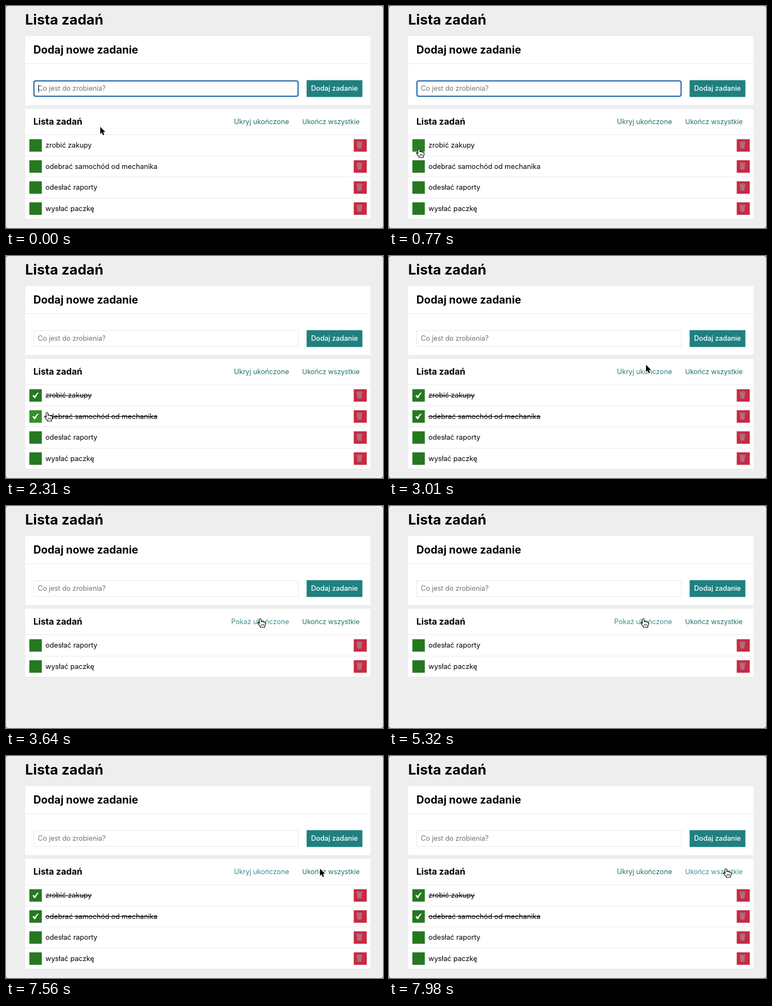
Recreate the animation shown at these times as an HTML page with a canvas. Size 688 px wide and 406 px high, loop 8 s.

```html
<!DOCTYPE html>
<html lang="pl">
<head>
<meta charset="utf-8">
<title>Lista zadań</title>
<style>
html, body { margin: 0; width: 100%; height: 100%; overflow: hidden; background: #eee; }
canvas { display: block; }
</style>
</head>
<body>
<canvas id="stage" width="688" height="406"></canvas>
<script>
const ctx = document.getElementById('stage').getContext('2d');
const LOOP = 8000;
const FIRST_CLICK = 1050, SECOND_CLICK = 1950, HIDE = 3570, SHOW = 5740;
const ROW = 38.5, LIST_TOP = 235.5;
const tasks = [
  { text: 'zrobić zakupy', doneAt: FIRST_CLICK },
  { text: 'odebrać samochód od mechanika', doneAt: SECOND_CLICK },
  { text: 'odesłać raporty', doneAt: Infinity },
  { text: 'wysłać paczkę', doneAt: Infinity }
];

// Pointer stops: time, x, y
const stops = [
  [70, 172, 221], [770, 54.5, 261], [1420, 54.5, 261], [1800, 57, 292],
  [2200, 57, 292], [2310, 75, 286], [3010, 469, 199], [3180, 464, 206],
  [7300, 464, 206], [7700, 615, 206]
];
const hideLink = { x: 411, y: 202, w: 106, h: 20 };
const finishLink = { x: 541, y: 202, w: 105, h: 20 };
const checkbox = row => ({ x: 43, y: 244 + row * ROW, w: 22, h: 22 });

function pointerAt(t) {
  const next = stops.findIndex(s => s[0] > t);
  if (next === 0) return stops[0].slice(1);
  if (next < 0) return stops[stops.length - 1].slice(1);
  const [t0, x0, y0] = stops[next - 1], [t1, x1, y1] = stops[next];
  const p = (t - t0) / (t1 - t0), e = p * p * (3 - 2 * p);
  return [x0 + (x1 - x0) * e, y0 + (y1 - y0) * e];
}

function isOver(box, t) {
  const [x, y] = pointerAt(t - 70);
  return x >= box.x && x <= box.x + box.w && y >= box.y && y <= box.y + box.h;
}

// Share of the last 200 ms spent over the box, used as a colour fade
function hoverLevel(box, t) {
  let hits = 0;
  for (let k = 0; k < 10; k++) hits += isOver(box, t - k * 20);
  return hits / 10;
}

const mix = (a, b, p) => `rgb(${a.map((v, i) => Math.round(v + (b[i] - v) * p))})`;

function rect(x, y, w, h, color) {
  ctx.fillStyle = color;
  ctx.fillRect(x, y, w, h);
}

// Filled box with a soft edge
function button(x, y, w, h, color) {
  rect(x - .4, y - .4, w + .8, h + .8, color);
}

function label(str, x, y, size, color = '#000', weight = 400, align = 'left') {
  ctx.font = `${weight} ${size}px Inter, sans-serif`;
  ctx.textAlign = align;
  ctx.fillStyle = color;
  ctx.fillText(str, x, y);
}

function polygon(points, color) {
  ctx.beginPath();
  points.forEach(([x, y]) => ctx.lineTo(x, y));
  ctx.closePath();
  ctx.fillStyle = color;
  ctx.fill();
}

function at(x, y, draw) {
  ctx.save();
  ctx.translate(x, y);
  draw();
  ctx.restore();
}

function tick() {
  ctx.fillStyle = '#fff';
  ctx.fill(new Path2D('M-5.8 .6Q-4.6-1-3.2-.8Q-2.2-.3-1.6 1.4Q.8-3.4 3.6-5H5.9Q2-1.2-.2 4.2Q-1.8 5.6-3 4.6Q-4.2 1.6-5.8 .6Z'));
}

function trash() {
  polygon([[-5, -5], [5, -5], [3.8, 5.6], [2.5, 6.4], [-2.5, 6.4], [-3.8, 5.6]], '#ab6578');
  ctx.strokeStyle = '#bd7f8f';
  ctx.lineWidth = .7;
  ctx.beginPath();
  for (const x of [-2.4, 0, 2.4]) {
    ctx.moveTo(x, -3);
    ctx.lineTo(x * .8, 5);
  }
  ctx.stroke();
  ctx.beginPath();
  ctx.ellipse(0, -5, 5.3, 1.5, 0, 0, 7);
  ctx.fillStyle = '#a05f72';
  ctx.fill();
  ctx.stroke();
}

function arrow() {
  const shape = [[0, 0], [0, 13], [3, 10.3], [5, 15.2], [7.3, 14.2], [5.3, 9.5], [9.2, 9.2]];
  ctx.lineJoin = 'round';
  ctx.strokeStyle = '#fff';
  ctx.lineWidth = 2;
  polygon(shape, '#000');
  ctx.stroke();
  ctx.fill();
}

function hand() {
  const shape = new Path2D(`M-1.7 9V1.5Q-1.5 0 0 0Q1.4 0 1.6 1.5V5.4
    Q3.4 4.2 4.6 5.9Q6.3 5 7.2 6.7Q9.5 6 9.6 8.3V10.5Q9.4 12.5 8.2 13.6V16
    H.3V14.3Q-1.8 12.7-3 10.5L-4.6 8.2Q-4.8 6.5-3.2 6.9Z`);
  ctx.fillStyle = '#fff';
  ctx.fill(shape);
  ctx.strokeStyle = '#000';
  ctx.lineWidth = 1.1;
  ctx.lineJoin = 'round';
  ctx.stroke(shape);
  ctx.lineWidth = .8;
  ctx.beginPath();
  for (const x of [2, 4.2, 6.4]) {
    ctx.moveTo(x, 9.5);
    ctx.lineTo(x, 13.3);
  }
  ctx.stroke();
}

function drawForm(t) {
  rect(35, 55, 630, 126, '#fff');
  rect(35, 105, 630, 1, '#eaeaea');
  label('Dodaj nowe zadanie', 50, 86.5, 19.5, '#000', 700);
  const focused = t < FIRST_CLICK;
  ctx.beginPath();
  if (focused) {
    ctx.roundRect(51, 137, 482, 28, 3);
    ctx.strokeStyle = '#1b62ad';
    ctx.lineWidth = 2;
  } else {
    ctx.rect(50.5, 136.5, 483, 29);
    ctx.strokeStyle = '#e8e8e8';
    ctx.lineWidth = 1;
  }
  ctx.stroke();
  label('Co jest do zrobienia?', 58, 155, 12.5, '#757575');
  if (focused && t % 1000 < 500) rect(59, 144, 1, 14, '#000');
  button(549, 136, 101, 30, '#1f8080');
  label('Dodaj zadanie', 599.5, 155, 12.6, '#fff', 500, 'center');
}

function drawRow(task, row, t) {
  const y = row * ROW, box = checkbox(row);
  button(box.x, box.y, box.w, box.h, mix([38, 120, 32], [50, 145, 38], hoverLevel(box, t)));
  label(task.text, 72, 259 + y, 12.75);
  if (t >= task.doneAt) {
    at(54, 255 + y, tick);
    rect(72, Math.round(254.6 + y), ctx.measureText(task.text).width, 1, '#000');
  }
  button(635, 244 + y, 23, 22, '#c92941');
  at(645, 254.5 + y, trash);
  rect(35, Math.round(LIST_TOP + (row + 1) * ROW - .5), 630, 1, '#eaeaea');
}

function drawList(t) {
  const hidden = t >= HIDE && t < SHOW;
  const rows = tasks.filter(task => !hidden || t < task.doneAt);
  const linkColor = box => mix([30, 112, 106], [58, 144, 142], hoverLevel(box, t));
  rect(35, 188, 630, 47 + rows.length * ROW, '#fff');
  label('Lista zadań', 50, 217, 16, '#000', 700);
  label(hidden ? 'Pokaż ukończone' : 'Ukryj ukończone', 516.5, 216, 12.65, linkColor(hideLink), 400, 'right');
  label('Ukończ wszystkie', 645.5, 216, 12.3, linkColor(finishLink), 400, 'right');
  rect(35, 235, 630, 1, '#eaeaea');
  rows.forEach((task, row) => drawRow(task, row, t));
  return rows.length;
}

function drawCorners() {
  ctx.beginPath();
  ctx.rect(0, 0, 688, 406);
  ctx.roundRect(0, 0, 688, 406, 4);
  ctx.fillStyle = '#555';
  ctx.fill('evenodd');
}

function frame(now) {
  const t = now % LOOP;
  rect(0, 0, 688, 406, '#eee');
  label('Lista zadań', 35, 34, 25.6, '#000', 700);
  drawForm(t);
  const count = drawList(t);
  drawCorners();
  const targets = [hideLink, finishLink];
  for (let row = 0; row < count; row++) targets.push(checkbox(row));
  const [x, y] = pointerAt(t);
  at(x, y, targets.some(box => isOver(box, t)) ? hand : arrow);
  requestAnimationFrame(frame);
}
requestAnimationFrame(frame);
</script>
</body>
</html>
```
